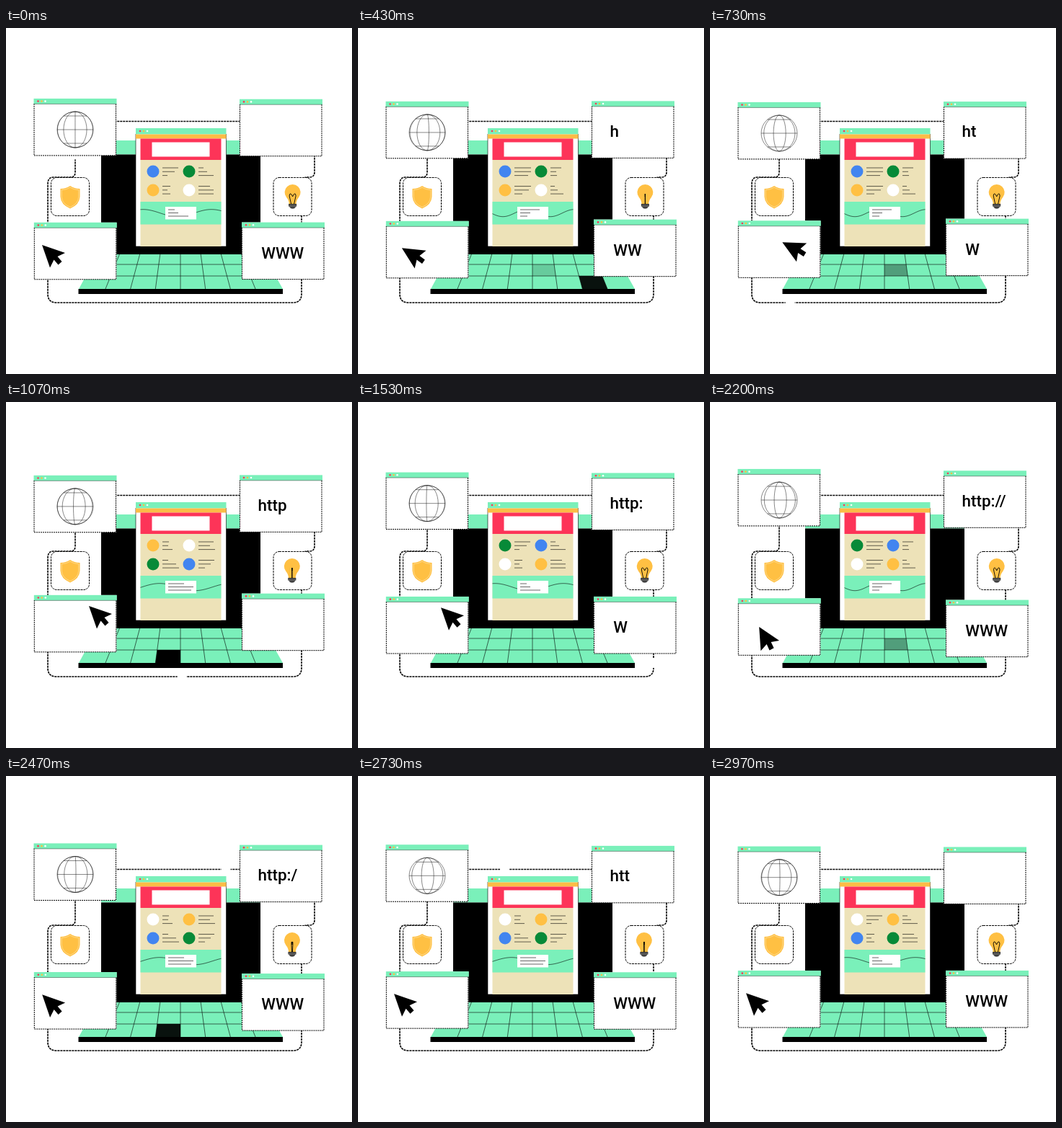
These frames come from a looping animation (480x480 px, 3000 ms). An HTML page:

```html
<!DOCTYPE html>
<html lang="en">
<head>
<meta charset="utf-8">
<title>Web design loop</title>
<style>
html, body { margin: 0; width: 100%; height: 100%; overflow: hidden; background: #fff; }
svg { display: block; width: 100vw; height: 100vh; }
text { font: 500 22.4px Roboto, "Liberation Sans", sans-serif; }
.thin { fill: none; stroke: #000; stroke-width: .6; }
.edge { fill: none; stroke: #000; stroke-dasharray: 2 1; }
</style>
</head>
<body>
<svg id="stage" viewBox="0 0 480 480"></svg>
<script>
const LOOP = 3000, TAU = Math.PI * 2;
const GREEN = '#7af0ba', PINK = '#fd3458', GOLD = '#ffc043', TAN = '#ede2b8';
const BLUE = '#4285f0', LEAF = '#078a38', WHITE = '#fff';
const stage = document.getElementById('stage');

function add(parent, tag, attrs = {}) {
  const node = document.createElementNS('http://www.w3.org/2000/svg', tag);
  return parent.appendChild(set(node, attrs));
}
function set(node, attrs) {
  for (const name in attrs) node.setAttribute(name, attrs[name]);
  return node;
}
const group = (parent = stage) => add(parent, 'g');
const rect = (parent, x, y, width, height, fill, more) =>
  add(parent, 'rect', { x, y, width, height, fill, ...more });
const circle = (parent, cx, cy, r, fill) => add(parent, 'circle', { cx, cy, r, fill });
const path = (parent, d, attrs = { class: 'thin' }) => add(parent, 'path', { d, ...attrs });
const clamp = v => Math.min(1, Math.max(0, v));
const ease = u => u < .5 ? 2 * u * u : 1 - 2 * (1 - u) ** 2;

function dots(parent, x, y) {
  [PINK, GOLD, WHITE].forEach((fill, i) => circle(parent, x + i * 5, y, 1.3, fill));
}

// Connecting route with a gap that runs along it
const route = 'M96 129.5V200Q96 207 89 207H66Q58 207 58 216V369Q58 381 70 381H398Q410 381 410 369' +
  'V216Q410 207 418 207H421Q428 207 428 200V129.5Z';
path(stage, route, { fill: 'none', stroke: '#000', 'stroke-width': 1.6, 'stroke-dasharray': '3 1' });
const gap = path(stage, route, { fill: 'none', stroke: WHITE, 'stroke-width': 4 });
const routeLength = gap.getTotalLength();
const GAP = 13;
gap.setAttribute('stroke-dasharray', `${GAP} ${routeLength - GAP}`);

// Laptop
rect(stage, 132, 156, 221, 19.5, GREEN);
rect(stage, 132, 175.5, 221, 139, '#000');
path(stage, 'M127 314H357L384 362H101Z', { fill: GREEN });
const column = (n, y) => 242 + n * (28.2 + (y - 314) * .135);
const quad = (a, b, top, bottom) =>
  `M${column(a, top)} ${top}H${column(b, top)}L${column(b, bottom)} ${bottom}H${column(a, bottom)}Z`;
const keys = [[0, 328, 344, 412], [2, 344, 362, 320], [-1, 344, 362, 890]]
  .map(([col, top, bottom, start]) => ({ start, node: path(stage, quad(col, col + 1, top, bottom), {}) }));
for (let n = -3; n <= 3; n++) path(stage, `M${column(n, 314)} 314L${column(n, 362)} 362`);
for (const y of [328, 344]) path(stage, `M${column(-4, y)} ${y}H${column(4, y)}`);
rect(stage, 100.5, 362, 283.5, 7, '#000');

// Page in the middle
rect(stage, 180, 139, 125.5, 164, WHITE);
path(stage, 'M180 147V303H305.5V147');
rect(stage, 180, 139, 125.5, 8.5, GREEN);
dots(stage, 186, 143);
rect(stage, 180, 147.5, 125.5, 6, '#fcbc46');
rect(stage, 186.5, 153.5, 112, 29.5, PINK);
rect(stage, 202.5, 158.5, 80, 20, WHITE);
rect(stage, 186.5, 183, 112, 120, TAN);
rect(stage, 186.5, 241, 112, 31.5, GREEN);
const wave = path(stage, '');
rect(stage, 221, 248, 43, 17.5, WHITE);
const writing = path(stage, '');
const spots = [[204, 199], [254, 199], [204, 225], [254, 225]].map(([x, y]) => circle(stage, x, y, 8.5));
const palettes = [
  [BLUE, LEAF, GOLD, WHITE],
  [GOLD, WHITE, LEAF, BLUE],
  [LEAF, BLUE, WHITE, GOLD],
  [WHITE, GOLD, BLUE, LEAF]
];
const blocks = [[217, 194, 5.3], [267, 194, 5.3], [217, 219.5, 5.3], [267, 219.5, 5.3], [225, 252, 4.5]];
const poses = [
  { crest: 190, span: 95, lines: [[22, 17, 7], [7, 12, 21], [11, 7, 11], [16, 21, 21], [9, 14, 28]] },
  { crest: 234, span: 66, lines: [[23, 23, 19], [15, 8, 9], [23, 20, 11], [6, 10, 18], [27, 14, 10]] },
  { crest: 213, span: 98, lines: [[9, 8, 14], [21, 16, 23], [8, 19, 23], [22, 17, 9], [22, 35, 32]] }
];

// Icon tiles
for (const x of [62.5, 371])
  rect(stage, x, 207.5, 53, 53, WHITE, { rx: 8, stroke: '#000', 'stroke-dasharray': '3 1' });
const shield = 'M89 219Q95 223 102.5 223V234Q102 245 89 250.5Q76 245 75.5 234V223Q83 223 89 219Z';
path(stage, shield, { fill: GOLD });
path(stage, shield, {
  fill: 'none', stroke: '#ffe3a5', 'stroke-width': .8,
  transform: 'translate(89 235) scale(.87) translate(-89 -235)'
});
const bulb = group();
path(bulb, 'M-5 15Q-5 10 -8.5 6A11 11 0 1 1 8.5 6Q5 10 5 15Z', { fill: GOLD });
path(bulb, 'M-5.5 15H5.5V18.5H4V20Q0 23 -4 20V18.5H-5.5Z', { fill: '#222' });
path(bulb, 'M-5 16.8H5M-4 19H4', { stroke: '#ddd', 'stroke-width': .6 });
const filament = path(bulb, '', { fill: 'none', stroke: '#000', 'stroke-width': .9 });

// Floating windows
function makeWindow(x, y, swing) {
  const node = group();
  rect(node, x, y, 114.5, 79, WHITE);
  path(node, `M${x + .5} ${y + 7}V${y + 79}H${x + 114}V${y + 7}`, { class: 'edge' });
  rect(node, x, y, 115, 7.5, GREEN);
  path(node, `M${x} ${y + 7.5}h115`, { stroke: '#000', 'stroke-width': .4 });
  dots(node, x + 6, y + 3.7);
  return { node, swing };
}
const globeWindow = makeWindow(38.5, 97.9, 5);
const urlWindow = makeWindow(324, 98.7, 3.4);
const cursorWindow = makeWindow(38.8, 269.8, -2.5);
const webWindow = makeWindow(327, 269.6, -5);
const windows = [globeWindow, urlWindow, cursorWindow, webWindow];

const globe = group(globeWindow.node);
set(globe, { transform: 'translate(96 141)', fill: 'none', stroke: '#111', 'stroke-width': .5 });
add(globe, 'circle', { r: 25 });
path(globe, 'M-25 0H25M-16.2 -19H16.2M-16.2 19H16.2', {});
const meridians = path(globe, '', {});
const urlText = add(urlWindow.node, 'text', { x: 349.6, y: 148 });
const webText = add(webWindow.node, 'text', { x: 354.2, y: 320 });
const cursor = path(cursorWindow.node, 'M0 0L32 11L21.5 16L27.5 23L22.5 27.5L16.5 20.5L11 31.5Z', { fill: '#000' });

function drawCursor(t) {
  const back = t >= LOOP / 2;
  const u = ease(clamp((t % 1500 - 200) / 800));
  const along = back ? 1 - u : u;
  const x = 50 + 65 * along;
  const y = 301 - 16 * along + 64 * u * (1 - u);
  const turn = (back ? 20 : -26) * Math.sin(Math.PI * u);
  cursor.setAttribute('transform', `translate(${x} ${y}) rotate(${turn})`);
}

function drawGlobe(t) {
  const step = 40, shift = t / 500 % 1;
  let d = '';
  for (let k = -2; k <= 3; k++) {
    const angle = (k - shift) * step;
    if (Math.abs(angle) >= 90) continue;
    const rx = 25 * Math.sin(angle * Math.PI / 180);
    d += `M0 -25A${Math.abs(rx)} 25 0 0 ${rx > 0 ? 1 : 0} 0 25`;
  }
  meridians.setAttribute('d', d);
}

function drawPage(t) {
  spots.forEach((spot, i) => spot.setAttribute('fill', palettes[Math.floor(t / 750)][i]));
  const { crest, span, lines } = poses[Math.floor(t / 500 + .5) % 3];
  writing.setAttribute('d', blocks.map(([x, y, leading], b) =>
    lines[b].map((w, i) => `M${x} ${y + i * leading}h${w}`).join('')).join(''));
  let d = '';
  for (let x = 186.5; x <= 298.5; x += 2)
    d += `${d ? 'L' : 'M'}${x} ${256.7 - 5 * Math.cos(TAU * (x - crest) / span)}`;
  wave.setAttribute('d', d);
}

function drawBulb(t) {
  const angle = TAU * t / 1500;
  const w = Math.cos(angle) ** 3;
  bulb.setAttribute('transform', `translate(${397.6 + .8 * Math.sin(angle)} 229)`);
  filament.setAttribute('d', `M${-2 * w} 15L${-4.5 * w} 4Q${-4 * w} -1 ${-1.5 * w} 2L0 5` +
    `L${1.5 * w} 2Q${4 * w} -1 ${4.5 * w} 4L${2 * w} 15`);
}

function drawKeys(t) {
  const phase = t < 1500 ? t : t - 1470;
  for (const { start, node } of keys) {
    const age = phase - start;
    node.setAttribute('fill-opacity', Math.min(clamp(age / 120), clamp((360 - age) / 120)));
  }
}

function drawText(t) {
  const typed = Math.floor(clamp((t - 60) / 1750) * 7);
  const erased = Math.floor(clamp((t - 2400) / 490) * 7);
  urlText.textContent = 'http://'.slice(0, Math.max(0, typed - erased));
  const count = t < 1200 ? 3 - Math.min(3, Math.floor(t / 300)) : Math.min(3, Math.floor((t - 1000) / 400));
  webText.textContent = 'W'.repeat(count);
}

function draw(t) {
  const sway = Math.sin(TAU * t / LOOP);
  for (const { node, swing } of windows) node.setAttribute('transform', `translate(0 ${swing * sway})`);
  gap.setAttribute('stroke-dashoffset', -(46 + .391 * t - GAP / 2));
  drawCursor(t);
  drawGlobe(t);
  drawPage(t);
  drawBulb(t);
  drawKeys(t);
  drawText(t);
}

const begin = performance.now();
function tick() {
  draw((performance.now() - begin) % LOOP);
  requestAnimationFrame(tick);
}
tick();
</script>
</body>
</html>
```
